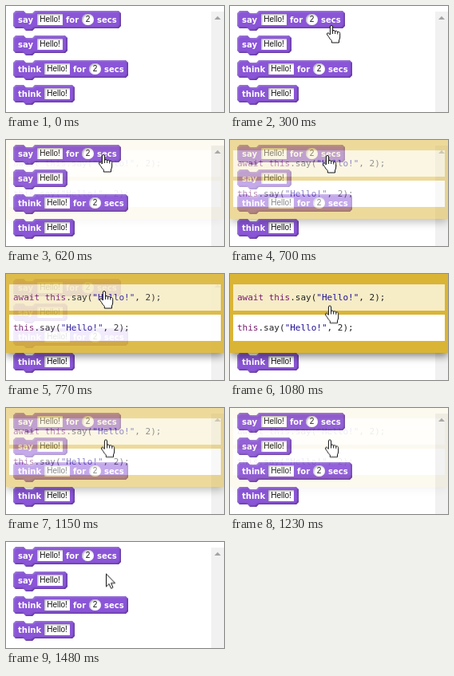
Recreate the animation shown at these times as an HTML page. Size 273x133 px, loop 1630 ms.

```html
<!DOCTYPE html>
<html lang="en">
<head>
<meta charset="utf-8">
<title>Blocks to code</title>
<style>
html, body { margin: 0; width: 100%; height: 100%; overflow: hidden; background: #fff; }
#stage { position: relative; width: 273px; height: 133px; overflow: hidden; }
svg { position: absolute; left: 0; top: 0; }
.label { font: bold 10px "DejaVu Sans", sans-serif; fill: #fff; }
.value { font: 10px "Liberation Sans", Arial, sans-serif; fill: #111; text-anchor: middle; }
.block { fill: #8a55d7; filter: url(#raised); }
.field { fill: #fff; filter: url(#sunken); }

#panel {
  position: absolute; left: 0; top: 0; width: 273px; height: 99px;
  background: #dab434; box-shadow: 0 4px 10px rgba(0, 0, 0, .5);
  opacity: 0; animation: fade 1.63s step-end infinite;
}
.line {
  position: absolute; left: 4px; width: 265px; height: 33px; padding-left: 5px;
  box-sizing: border-box; background: #fff; color: #222; white-space: pre;
  font: 11px/33px "DejaVu Sans Mono", monospace;
}
.line.hover { background: #f6ecc6; }
.key { color: #7a1a6e; }
.str { color: #219; }

#cursor { animation: move 1.63s step-end infinite; }
#cursor path { fill: #fff; stroke: #111; stroke-linejoin: round; }
#arrow { animation: arrow 1.63s step-end infinite; }
#hand { animation: hand 1.63s step-end infinite; }

@keyframes fade {
  0% { opacity: 0; }
  38.03% { opacity: .07; }
  42.94% { opacity: .5; }
  47.23% { opacity: .89; }
  52.75% { opacity: 1; }
  70.55% { opacity: .5; }
  75.46% { opacity: .08; }
  80.98%, 100% { opacity: 0; }
}
@keyframes move {
  0%, 4.29% { transform: translate(238px, 100px); }
  9.2% { transform: translate(190px, 64px); }
  14.11% { transform: translate(149px, 38px); }
  18.4% { transform: translate(127px, 24px); }
  23.31% { transform: translate(121px, 14px); }
  28.22% { transform: translate(117px, 8px); }
  33.12% { transform: translate(119px, 13px); }
  38.03% { transform: translate(122px, 18px); }
  42.94% { transform: translate(122px, 19px); }
  47.23% { transform: translate(123px, 21px); }
  52.75% { transform: translate(123px, 26px); }
  57.05% { transform: translate(124px, 33px); }
  61.34% { transform: translate(125px, 38px); }
  66.25%, 100% { transform: translate(125px, 39.5px); }
}
@keyframes arrow {
  0% { opacity: 0; }
  4.29% { opacity: 1; }
  18.4% { opacity: 0; }
  80.98%, 100% { opacity: 1; }
}
@keyframes hand {
  0% { opacity: 0; }
  18.4% { opacity: 1; }
  80.98%, 100% { opacity: 0; }
}
</style>
</head>
<body>
<div id="stage">
  <svg width="273" height="133">
    <defs id="bevels"></defs>
    <rect x="257" y="7" width="16" height="126" fill="#f1f1f1"/>
    <path d="M261 17L265 12.7L269 17Z" fill="#a3a3a3"/>
    <g id="blocks"></g>
  </svg>
  <div id="panel">
    <div class="line hover" style="top:13px"><span class="key">await this</span>.say(<span class="str">"Hello!"</span>, 2);</div>
    <div class="line" style="top:51px"><span class="key">this</span>.say(<span class="str">"Hello!"</span>, 2);</div>
  </div>
  <svg width="273" height="133">
    <g id="cursor">
      <path id="arrow" d="M.5 .5V16.5L4.1 13.1L6.6 18.7L9 17.6L6.6 12.1H11.6Z"/>
      <g id="hand">
        <path d="M-1.6 12V2Q-1.6 .5 0 .5T1.6 2V7.5Q1.8 6.3 3.1 6.5T4.7 8Q5.2 7 6.4 7.3T7.8 9Q8.6 8 9.7 8.6T10.7 10.5V15Q10.7 17 9.5 19V22H.3V19.5Q-2 17.5 -3.5 14.5L-5.3 12Q-6 10.7 -5 10T-2.8 10.6Z"/>
        <path d="M1.6 7V11M4.7 8V11M7.8 9V11.5"/>
      </g>
    </g>
  </svg>
</div>
<script>
// One lit or shaded rim: the shape minus its blurred, shifted alpha.
const rim = (name, shift, color, opacity) => `
  <feOffset in="blur" dx="${shift}" dy="${shift}" result="${name}Shift"/>
  <feComposite in="SourceAlpha" in2="${name}Shift" operator="arithmetic" k2="1" k3="-1" result="${name}Edge"/>
  <feFlood flood-color="${color}" flood-opacity="${opacity}"/>
  <feComposite in2="${name}Edge" operator="in" result="${name}"/>`;

const bevel = (id, dir) => `
  <filter id="${id}" x="-50%" y="-50%" width="200%" height="200%">
    <feGaussianBlur in="SourceAlpha" stdDeviation="1" result="blur"/>
    ${rim("light", dir, "#fff", .15)}
    ${rim("dark", -dir, "#000", .7)}
    <feMerge><feMergeNode in="SourceGraphic"/><feMergeNode in="light"/><feMergeNode in="dark"/></feMerge>
  </filter>`;

const shape = (w, h) =>
  `M0 3L3 0H13L16 3H24L27 0H${w - 3}L${w} 3V${h - 3}L${w - 3} ${h}` +
  `H27L24 ${h + 3}H16L13 ${h}H3L0 ${h - 3}Z`;
const label = (x, s) => `<text class="label" x="${x}" y="14.7">${s}</text>`;
const field = (x, w, s, r = 0) =>
  `<rect class="field" x="${x}" y="4" width="${w}" height="14" rx="${r}"/>` +
  `<text class="value" x="${x + w / 2}" y="14.3">${s}</text>`;

function block(y, name, x, timed) {
  const w = x + (timed ? 105 : 38);
  const tail = timed
    ? label(x + 36, "for") + field(x + 56, 15, "2", 7) + label(x + 75, "secs")
    : "";
  return `<g transform="translate(9 ${y})">
    <path class="block" d="${shape(w, 22)}"/>
    ${label(6, name)}${field(x, 32, "Hello!")}${tail}</g>`;
}

document.getElementById("bevels").innerHTML = bevel("raised", 1) + bevel("sunken", -1);
document.getElementById("blocks").innerHTML =
  block(6, "say", 30, true) + block(37, "say", 30, false) +
  block(68, "think", 39, true) + block(99, "think", 39, false);
</script>
</body>
</html>
```
